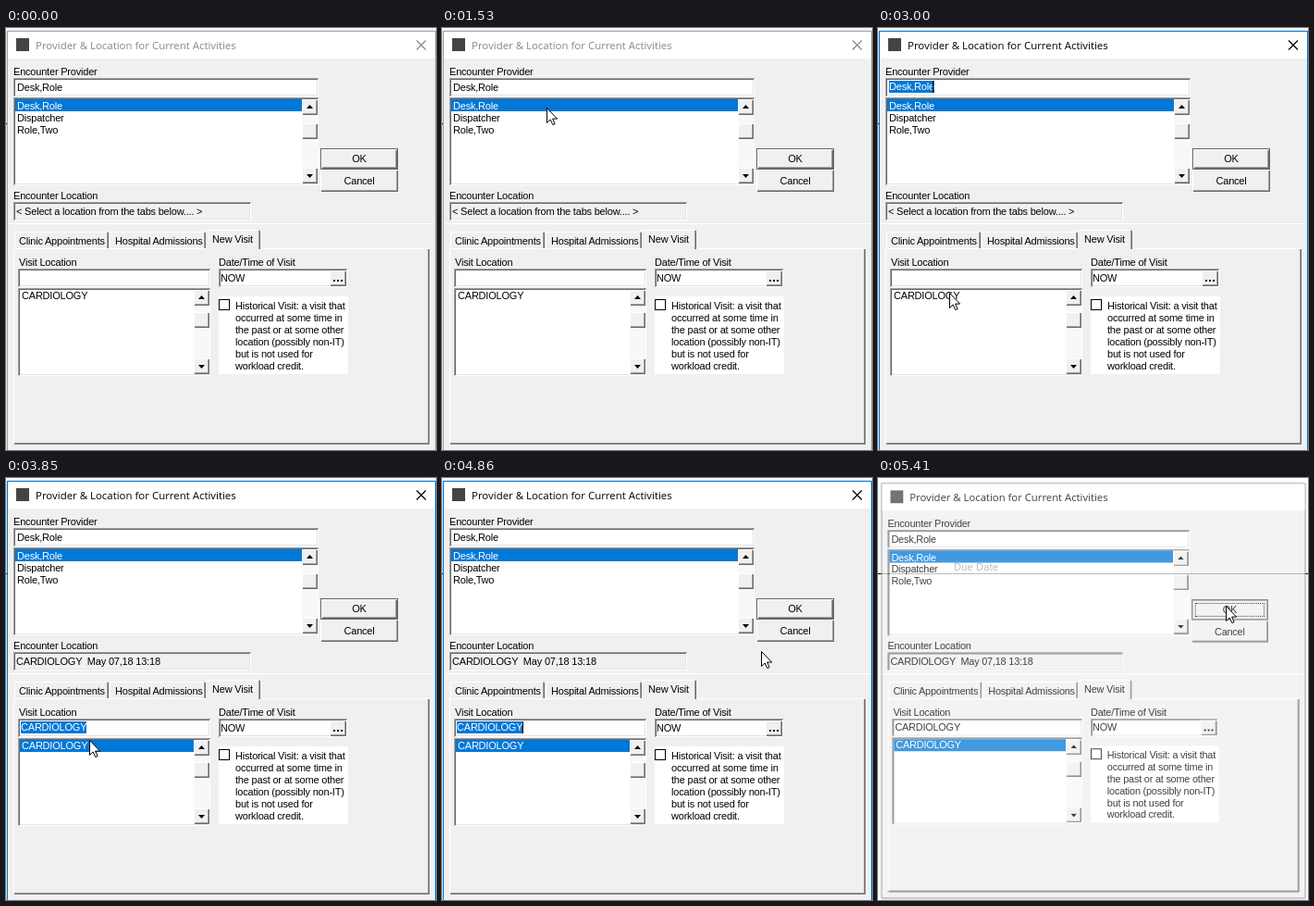
These frames come from a looping animation (465x456 px, 5.49 s). An HTML page:

```html
<!DOCTYPE html>
<html lang="en">
<head>
<meta charset="utf-8">
<title>Provider &amp; Location</title>
<style>
html, body { margin: 0; width: 100%; height: 100%; overflow: hidden; background: #fff; }
#stage { position: relative; width: 465px; height: 456px; overflow: hidden; background: #fff; }
#stage div, #cursor { position: absolute; box-sizing: border-box; }
#backdrop, #dialog { inset: 0; }
#dialog { transform-origin: 232px 228px; }
.text { font: 11px/14px "Liberation Sans", Arial, sans-serif; letter-spacing: -.2px; white-space: pre; color: #000; }
.title { font: 11.45px/16px "Open Sans", sans-serif; letter-spacing: 0; color: #888; }
.frame { background: #f0f0f0; border: 1px solid #a5a5a5; box-shadow: 0 1px 5px rgba(0,0,0,.3); }
.white { background: #fff; }
.sunken { box-shadow: inset 1px 1px #a0a0a0, inset -1px -1px #fff, inset 2px 2px #696969, inset -2px -2px #e3e3e3; }
.raised { background: #f0f0f0; box-shadow: inset 1px 1px #fff, inset -1px -1px #696969, inset -2px -2px #a0a0a0; }
.label { text-align: center; }
.page { box-shadow: inset 1px 1px #fff, inset -1px -1px #696969, inset -2px -2px #a0a0a0; }
.tab { background: #f0f0f0; border-radius: 2px 2px 0 0; box-shadow: inset 1px 1px #fff, inset -1px 0 #696969, inset -2px 0 #a0a0a0; }
.track { background: #f8f8f8; }
.arrow { background: #000; clip-path: polygon(50% 0, 100% 100%, 0 100%); }
.down { transform: scaleY(-1); }
.row { background: #0078d7; }
.default { box-shadow: inset 0 0 0 1px #646464, inset 2px 2px #fff, inset -2px -2px #696969, inset -3px -3px #a0a0a0; }
.pressed { box-shadow: inset 0 0 0 1px #646464, inset 0 0 0 2px #a0a0a0; }
.focus { border: 1px dotted #000; }
.check { border: 1px solid #000; }
.selected { color: #fff; background: #0078d7; line-height: 13px; }
.black { background: #000; }
.active .frame { border-color: #0078d7; }
.closing .frame { border-color: #888; }
.active .title { color: #000; }
.close { stroke: #888; }
.active .close { stroke: #000; }
svg { position: absolute; overflow: visible; }
</style>
</head>
<body>
<div id="stage">
  <div id="backdrop"></div>
  <div id="dialog"></div>
  <svg id="cursor" width="12" height="19"><path d="M.5.5v16l3.7-3.5 2.6 5.6 2.3-1-2.5-5.5h5z" fill="#fff" stroke="#000"/></svg>
</div>
<script>
const LOOP = 5490;
const [backdrop, dialog, cursor] = ['backdrop', 'dialog', 'cursor'].map(id => document.getElementById(id));

function box(x, y, w, h, cls = '', parent = dialog) {
  const el = document.createElement('div');
  el.className = cls;
  el.style.cssText = `left:${x}px;top:${y}px;width:${w}px;height:${h}px`;
  parent.append(el);
  return el;
}

// y is the middle of the line
function text(x, y, str, cls = '', parent = dialog) {
  const el = document.createElement('div');
  el.className = 'text ' + cls;
  el.style.cssText = `left:${x}px;top:${y - 7}px`;
  el.textContent = str;
  parent.append(el);
  return el;
}

function label(x, y, w, str) {
  text(x, y, str, 'label').style.width = w + 'px';
}

function scrollbar(x, top, bottom, thumb) {
  box(x, top, 17, bottom - top, 'track');
  for (const y of [top, thumb, bottom - 17]) box(x, y, 17, 17, 'raised');
  box(x + 5, top + 6, 7, 4, 'arrow');
  box(x + 5, bottom - 10, 7, 4, 'arrow down');
}

function show(el, visible) { el.style.visibility = visible ? 'visible' : 'hidden'; }

// Window behind the dialog
box(0, 103, 465, 1, 'black', backdrop);
text(82, 96, 'Due Date', '', backdrop).style.letterSpacing = '.2px';

// Dialog frame and title bar
box(1, 3, 464, 454, 'frame');
box(2, 4, 462, 29, 'white');
box(11, 11, 14, 14).style.background = '#444';
text(32, 18, 'Provider & Location for Current Activities', 'title');
dialog.insertAdjacentHTML('beforeend',
  '<svg class="close" width="465" height="40"><path d="M444 13.5l10 10m0-10l-10 10" fill="none" stroke-width="1.2"/></svg>');
const closeMark = dialog.lastElementChild;

// Provider
text(8, 47, 'Encounter Provider');
box(8, 54, 330, 20, 'white sunken');
const provider = text(12, 64, 'Desk,Role');
const providerCaret = box(59, 57, 1, 13, 'black');
box(8, 75, 330, 95, 'white sunken');
box(10, 77, 310, 13, 'row');
text(12, 84, 'Desk,Role').style.color = '#fff';
text(12, 97, 'Dispatcher');
text(12, 110, 'Role,Two');
scrollbar(320, 77, 168, 103);

const okButton = box(340, 130, 84, 23, 'raised default');
box(340, 153, 84, 24, 'raised');
label(340, 141, 84, 'OK');
label(340, 165, 84, 'Cancel');
const okFocus = box(344, 134, 76, 15, 'focus');

// Location
text(8, 181, 'Encounter Location');
box(8, 188, 257, 20, 'sunken');
const encounter = text(11, 198, '');
box(2, 211, 462, 1, 'white');

// Tabs
box(8, 238, 450, 212, 'page');
box(9, 220, 102, 18, 'tab');
box(112, 220, 104, 18, 'tab');
box(216, 218, 59, 21, 'tab');
text(14, 230, 'Clinic Appointments');
text(118, 230, 'Hospital Admissions');
text(223, 228, 'New Visit');

text(14, 253, 'Visit Location');
box(13, 260, 208, 20, 'white sunken');
const visit = text(16, 270, 'CARDIOLOGY');
const visitCaret = box(87, 263, 1, 13, 'black');
box(13, 281, 208, 95, 'white sunken');
const visitRow = box(15, 283, 188, 13, 'row');
const visitItem = text(17, 289, 'CARDIOLOGY');
scrollbar(203, 283, 374, 307);

text(230, 253, 'Date/Time of Visit');
box(230, 260, 139, 20, 'white sunken');
text(232, 270, 'NOW');
box(350, 262, 18, 17, 'raised');
for (const x of [354, 358, 362]) box(x, 272, 2, 2, 'black');

box(230, 290, 140, 84, 'white');
box(230, 293, 12, 12, 'check');
['Historical Visit: a visit that', 'occurred at some time in', 'the past or at some other',
 'location (possibly non-IT)', 'but is not used for', 'workload credit.']
  .forEach((line, i) => text(248, 300 + 13 * i, line));

// Pointer moves happen in discrete steps
const smooth = u => u * u * (3 - 2 * u);
const easeOut = u => 1 - (1 - u) ** 1.8;
const moves = [
  { start: 520, end: 750, steps: 4, from: [348, 414], to: [203, 79], ease: easeOut, appear: true },
  { start: 980, end: 1440, steps: 7, from: [203, 79], to: [114, 86], ease: smooth, bend: -42.5 },
  { start: 1530, end: 1530, steps: 1, from: [114, 86], to: [113, 86], ease: smooth },
  { start: 2140, end: 2610, steps: 7, from: [113, 86], to: [81, 252], ease: u => u ** 1.82 },
  { start: 2690, end: 2840, steps: 3, from: [81, 252], to: [78, 285], ease: easeOut },
  { start: 3000, end: 3000, steps: 1, from: [78, 285], to: [77, 286], ease: smooth },
  { start: 3850, end: 4310, steps: 7, from: [77, 286], to: [313, 236], ease: smooth },
  { start: 4630, end: 5030, steps: 6, from: [313, 236], to: [376, 138], ease: smooth }
];

function pointerAt(t) {
  const m = moves.filter(move => t >= move.start).pop();
  if (!m) return null;
  const interval = (m.end - m.start) / (m.steps - 1) || 1;
  const step = Math.min(m.steps - 1, Math.floor((t - m.start) / interval + 0.05));
  const u = m.ease(m.appear ? step / (m.steps - 1) : (step + 1) / m.steps);
  const [x, y] = m.from.map((a, i) => a + (m.to[i] - a) * u);
  return [Math.round(x), Math.round(y + 2 * u * (1 - u) * (m.bend || 0))];
}

const blink = (t, start, end, period) => t >= start && t < end && Math.floor((t - start) / period) % 2 === 0;

function render(t) {
  const chosen = t >= 3300, pressed = t >= 5260, closing = t >= 5410;

  dialog.classList.toggle('active', t >= 1760);
  dialog.classList.toggle('closing', closing);
  dialog.style.transform = closing ? 'scale(.989)' : '';
  dialog.style.opacity = closing ? .74 : 1;
  show(closeMark, !closing);

  provider.classList.toggle('selected', t >= 1760 && !chosen);
  show(providerCaret, blink(t, 1760, 3300, 540));

  encounter.textContent = chosen ? 'CARDIOLOGY  May 07,18 13:18' : '< Select a location from the tabs below.... >';
  show(visit, chosen);
  visit.classList.toggle('selected', chosen && !pressed);
  show(visitCaret, blink(t, 3300, 5260, 550));
  show(visitRow, chosen);
  visitItem.style.color = chosen ? '#fff' : '#000';

  okButton.classList.toggle('pressed', pressed);
  show(okFocus, pressed);

  const pointer = pointerAt(t);
  show(cursor, pointer);
  if (pointer) cursor.style.transform = `translate(${pointer[0]}px, ${pointer[1]}px)`;
}

const origin = performance.now();
function tick() {
  render((performance.now() - origin) % LOOP);
  requestAnimationFrame(tick);
}
tick();
</script>
</body>
</html>
```
